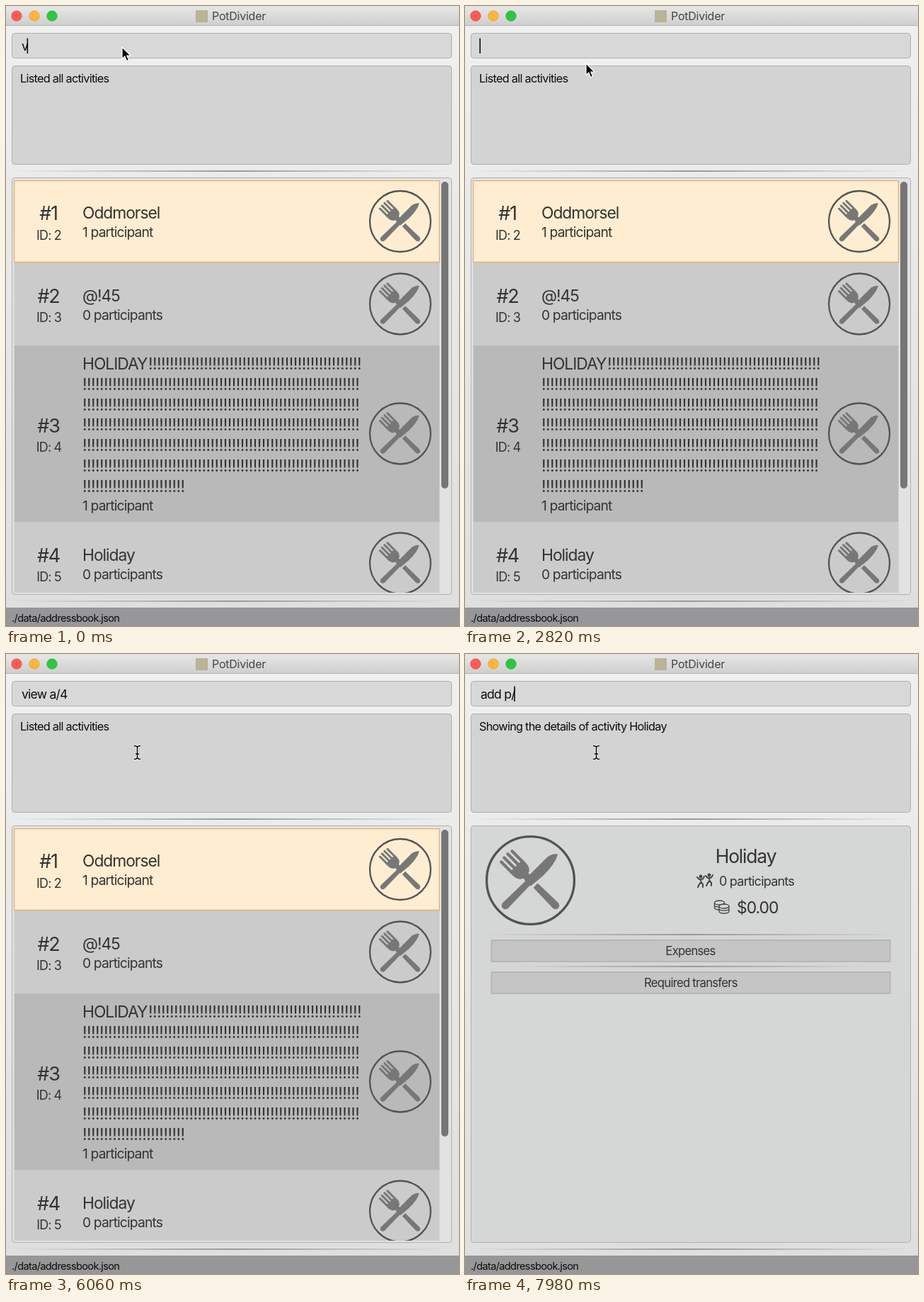
Recreate the animation shown at these times as an HTML page. Size 640x875 px, loop 8 s.

```html
<!DOCTYPE html>
<html lang="en">
<head>
<meta charset="utf-8">
<title>PotDivider</title>
<style>
  html, body { margin: 0; width: 100%; height: 100%; overflow: hidden; background: #e6e6e6; }
  svg { display: block; }
  text { font-family: Inter, "Open Sans", sans-serif; letter-spacing: -.045em; white-space: pre; fill: #333; }
  .mid { text-anchor: middle; }
  .dark { fill: #0c0c0c; }
</style>
</head>
<body>
<svg width="640" height="875" viewBox="0 0 640 875">
  <defs>
    <linearGradient id="bar" x2="0" y2="1">
      <stop stop-color="#e7e7e7"/><stop offset="1" stop-color="#cfcfcf"/>
    </linearGradient>
    <linearGradient id="window" x2="0" y2="1">
      <stop stop-color="#f0f0f0"/><stop offset="1" stop-color="#dedede"/>
    </linearGradient>
    <linearGradient id="fade">
      <stop stop-color="#999" stop-opacity="0"/><stop offset=".5" stop-color="#999"/>
      <stop offset="1" stop-color="#999" stop-opacity="0"/>
    </linearGradient>
    <clipPath id="listClip"><path d="M11 246H613V828H11Z"/></clipPath>
    <g id="meal" fill="#777">
      <circle r="43" fill="none" stroke="#535353" stroke-width="2.3"/>
      <g transform="rotate(-45)">
        <path d="M-7.5 -33V-19M-2.5 -34V-19M2.5 -34V-19M7.5 -33V-19" stroke="#777" stroke-width="3" stroke-linecap="round"/>
        <path d="M-9 -20H9V-16Q9 -8 3.5 -6.5V-2H-3.5V-6.5Q-9 -8 -9 -16Z"/>
        <path d="M-3 7H3L3.7 35Q3 38.5 0 38.5T-3.7 35Z"/>
      </g>
      <path transform="rotate(45)" d="M-4.5 4V-28Q-3 -35 1 -37Q6 -28 5.5 -12L4 4H3L3.7 35Q3 38.5 0 38.5T-3.7 35L-3 4Z"/>
    </g>
    <g id="coins" fill="#d5d7d6" stroke="#444" stroke-width="1.3">
      <path d="M0 3V10C0 14 14 14 14 10V3M0 6.5C0 10 14 10 14 6.5"/>
      <ellipse cx="7" cy="3" rx="7" ry="3"/>
    </g>
    <g id="dancer" fill="none" stroke="#444" stroke-width="2" stroke-linecap="round" stroke-linejoin="round">
      <circle cx="5" cy="3" r="1.4" fill="#444"/>
      <path d="M0 4L3 7L8 6.5L10 3M5 7L5.5 11L3 14L1 18M5.5 11L8 14V18"/>
    </g>
    <path id="beamLine" d="M-4.5 -9.5Q0 -9.5 0 -6.5Q0 -9.5 4.5 -9.5M0 -7V7M-4.5 9.5Q0 9.5 0 6.5Q0 9.5 4.5 9.5M-2.5 2H2.5"/>
  </defs>

  <rect width="640" height="875" fill="url(#window)"/>
  <rect width="640" height="27" fill="url(#bar)"/>
  <path d="M0 27.5H640" stroke="#b4b4b4"/>
  <circle cx="15" cy="14" r="7.3" fill="#fc5c56" stroke="#e2463f" stroke-width=".6"/>
  <circle cx="40" cy="14" r="7.3" fill="#fdb43d" stroke="#df9e2e" stroke-width=".6"/>
  <circle cx="65" cy="14" r="7.3" fill="#2dc640" stroke="#22ab31" stroke-width=".6"/>
  <rect x="268" y="6" width="17" height="17" fill="#b9b398"/>
  <text x="291" y="20" font-size="16" style="letter-spacing:-.015em;fill:#444">PotDivider</text>

  <g stroke="#b0b0b0">
    <rect x="8.5" y="38.5" width="621" height="35" rx="4" fill="#d8d8d8"/>
    <rect x="8.5" y="84.5" width="621" height="139" rx="4" fill="#d3d3d3"/>
    <rect id="panel" x="8.5" y="242.5" width="621" height="588" rx="4"/>
  </g>
  <rect x="8" y="232" width="622" height="2" fill="url(#fade)"/>
  <rect x="8" y="839" width="622" height="2" fill="url(#fade)"/>
  <rect y="849" width="640" height="26" fill="#97979a"/>
  <text class="dark" x="8" y="868.5" font-size="14.6">./data/addressbook.json</text>

  <text class="dark" id="command" x="22" y="63" font-size="17.6"></text>
  <rect id="caret" y="45.5" width="1.5" height="21.5"/>
  <text class="dark" id="result" x="20" y="108" font-size="16.3"></text>

  <g id="list">
    <g id="rows" clip-path="url(#listClip)"></g>
    <rect x="615" y="248" width="10" height="433" rx="5" fill="#767676"/>
  </g>

  <g id="details">
    <use href="#meal" transform="translate(92.5 319.5) scale(1.44)"/>
    <text class="mid" x="396.5" y="295" font-size="26.5">Holiday</text>
    <use href="#dancer" x="328" y="311"/>
    <use href="#dancer" x="340" y="309"/>
    <text x="359" y="327" font-size="18.1">0 participants</text>
    <use href="#coins" x="352.5" y="348"/>
    <use href="#coins" x="359" y="353"/>
    <text x="384" y="366" font-size="23">$0.00</text>
    <rect x="25" y="395" width="588" height="2" fill="url(#fade)"/>
    <rect x="70" y="440" width="500" height="2" fill="url(#fade)"/>
    <g fill="#c5c5c5" stroke="#b6b6b6" stroke-width="2">
      <rect x="37.5" y="404" width="563" height="30"/>
      <rect x="37.5" y="449" width="563" height="30"/>
    </g>
    <text class="mid" x="318.5" y="425" font-size="16.7">Expenses</text>
    <text class="mid" x="319" y="470" font-size="16.7">Required transfers</text>
  </g>

  <path id="arrow" d="M0 0V16.5L3.8 13L6.5 19.5L9.5 18.2L6.8 12H12Z" stroke="#fff" stroke-width="1.2"/>
  <g id="beam" fill="none">
    <use href="#beamLine" stroke="#fff" stroke-width="3.2"/>
    <use href="#beamLine" stroke="#000" stroke-width="1.5"/>
  </g>
</svg>
<script>
const LOOP = 8000, BLINK = 480, ENTER = 6120;
const $ = id => document.getElementById(id);
const label = (x, y, size, text, cls = '') =>
  `<text class="${cls}" x="${x}" y="${y}" font-size="${size}">${text}</text>`;

// Each mark gets its own x, so the run keeps an even pitch.
const bangs = (x, y, count) =>
  label(Array.from({ length: count }, (_, i) => x + i * 6.02).join(' '), y, 22.8, '!'.repeat(count));

function row(n, top, height, mid, name, people, extra = 0) {
  const fill = n === 1 ? '#ffedd1' : n % 2 ? '#b9b9b9' : '#cbcbcb';
  const border = n === 1 ? 'stroke="#e3b078" stroke-width="1.5"' : '';
  return `<rect x="11.5" y="${top}" width="601" height="${height}" fill="${fill}" ${border}/>` +
    label(60, mid - 2, 27, '#' + n, 'mid') +
    label(60.5, mid + 25.5, 18, 'ID: ' + (n + 1), 'mid') +
    label(108, mid - 4 - extra, 22.8, name) +
    label(108, mid + 22 + extra, 19.3, people) +
    `<use href="#meal" x="557" y="${mid}"/>`;
}

let holiday = bangs(201, 513, 50);
for (let i = 1; i < 7; i++) holiday += bangs(108, 513 + i * 28.75, i < 6 ? 65 : 24);

$('rows').innerHTML =
  row(2, 362, 117, 420.5, '@!45', '0 participants') +
  row(3, 479, 249, 603.5, 'HOLIDAY', '1 participant', 86.5) + holiday +
  row(4, 728, 117, 786.5, 'Holiday', '0 participants') +
  row(1, 246.5, 115, 304, 'Oddmorsel', '1 participant');

// Moments at which the command line changes: [ms, text].
const edits = [[0, 'v'], [120, '']];
function type(text, times) {
  times.forEach((t, i) => edits.push([t, text.slice(0, i + 1)]));
}
type('list ', [360, 480, 600, 720, 900]);
edits.push([1500, '']);
type('view a/4', [3780, 3900, 3960, 4080, 4200, 4320, 4440, 5580]);
edits.push([ENTER, '']);
type('add p/', [6840, 7020, 7140, 7260, 7680, 7920]);

const path = [[0, 164, 58], [2280, 164, 58], [2580, 169, 75], [2760, 169, 75],
  [2820, 171, 81], [3000, 185.5, 139], [LOOP, 185.5, 139]];

function pointer(t) {
  const i = path.findIndex(p => p[0] > t);
  const [t0, x0, y0] = path[i - 1], [t1, x1, y1] = path[i];
  const k = (t - t0) / (t1 - t0);
  return [x0 + (x1 - x0) * k, y0 + (y1 - y0) * k];
}

const show = (id, on) => $(id).setAttribute('visibility', on ? 'visible' : 'hidden');

function draw(now) {
  const t = now % LOOP;
  const [since, text] = edits.filter(e => e[0] <= t).pop();
  const opened = t >= ENTER;

  $('command').textContent = text;
  $('caret').setAttribute('x', 20.5 + (text ? $('command').getComputedTextLength() : 0));
  show('caret', Math.floor((t - since) / BLINK) % 2 === 0);

  $('result').textContent = opened ? 'Showing the details of activity Holiday' : 'Listed all activities';
  $('panel').setAttribute('fill', opened ? '#d5d7d6' : '#e2e2e2');
  show('list', !opened);
  show('details', opened);

  const [x, y] = pointer(Math.floor(t / 60) * 60);
  for (const id of ['arrow', 'beam']) {
    $(id).setAttribute('transform', `translate(${x} ${y})`);
    show(id, (id === 'beam') === (y > 92));
  }
  requestAnimationFrame(draw);
}
requestAnimationFrame(draw);
</script>
</body>
</html>
```
